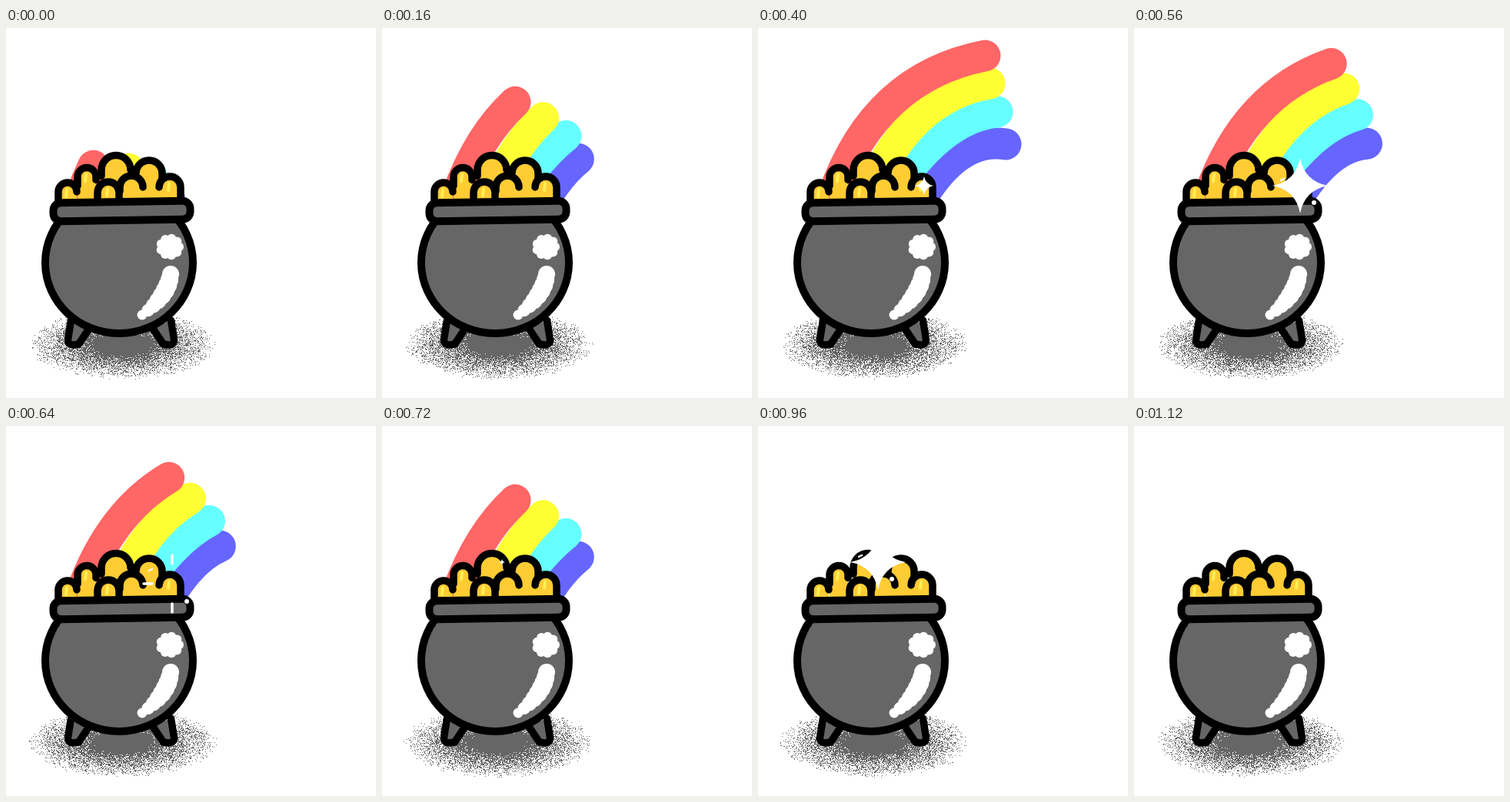
Recreate the animation shown at these times as an HTML page with a canvas. Size 481x481 px, loop 1200 ms.

```html
<!DOCTYPE html>
<html lang="en">
<head>
<meta charset="utf-8">
<title>Pot of gold</title>
<style>
  html, body { margin: 0; width: 100%; height: 100%; overflow: hidden; background: #fff; }
  canvas { display: block; width: 100vw; height: 100vh; }
</style>
</head>
<body>
<canvas id="stage" width="481" height="481"></canvas>
<script>
const ctx = document.getElementById('stage').getContext('2d');
const STEP = 80, STEPS = 15, PEAK = 5;
const GREY = '#666', GOLD = '#ffcc33', SHINE = '#ffee55';

// Quadratic curves, back to front: colour, base, control, full tip.
const bands = [
  ['#6666ff', [198, 248], [252, 140], [322, 151]],
  ['#66ffff', [172, 218], [238, 116], [311, 109]],
  ['#ffff33', [145, 214], [198, 89], [301, 72]],
  ['#ff6666', [98, 217], [152, 64], [295, 36]]
];

// Arches: centre x, top y, radius, left leg, right leg.
const coins = [
  [143, 165.5, 19, 8, 0], [186, 172, 17, 0, 7], [105, 181.5, 12, 12, 4],
  [213, 193, 14, 0, 18], [80, 201, 12, 12, 0], [163, 192, 15, 5, 0],
  [133, 200, 14, 8, 8]
];

// Position, first step, steps alive.
const sparkles = [[106, 188, 3, 2], [216, 205, 4, 5], [156, 177, 9, 5]];

const mix = (a, b, t) => a + (b - a) * t;
const between = (p, q, t) => [mix(p[0], q[0], t), mix(p[1], q[1], t)];

function ink(color, width) {
  ctx.strokeStyle = color;
  ctx.lineWidth = width;
  ctx.stroke();
}

function paint(color) {
  ctx.fillStyle = color;
  ctx.fill();
}

function line(x1, y1, x2, y2, color, width) {
  ctx.beginPath();
  ctx.moveTo(x1, y1);
  ctx.lineTo(x2, y2);
  ink(color, width);
}

function dot(x, y, r) {
  ctx.beginPath();
  ctx.arc(x, y, r, 0, Math.PI * 2);
  paint('#fff');
}

function random(seed) {
  return () => {
    seed = (seed + 0x6D2B79F5) | 0;
    let t = Math.imul(seed ^ (seed >>> 15), 1 | seed);
    t = (t + Math.imul(t ^ (t >>> 7), 61 | t)) ^ t;
    return ((t ^ (t >>> 14)) >>> 0) / 4294967296;
  };
}

// Grainy shadow, reshuffled at each step.
function shadow(step) {
  const rnd = random(step * 977 + 5);
  ctx.fillStyle = GREY;
  for (let y = 366; y < 458; y++) {
    for (let x = 27; x < 276; x++) {
      const d = Math.hypot((x - 151) / 124, (y - 411) / 46);
      if (rnd() < 1.4 * (1 - d)) ctx.fillRect(x, y, 1, 1);
    }
  }
}

// Grows until the peak, then shrinks back along the same curve.
function rainbow(step) {
  const stage = PEAK - Math.abs(step - PEAK - (step > PEAK ? 1 : 0));
  if (stage < 0) return;
  const t = Math.min(1, 0.13 + 0.182 * stage);
  for (const [color, base, bend, end] of bands) {
    const mid = between(base, bend, t);
    const tip = between(mid, between(bend, end, t), t);
    ctx.beginPath();
    ctx.moveTo(...base);
    ctx.quadraticCurveTo(...mid, ...tip);
    ink(color, 41);
  }
}

function arch(x, top, r, left, right) {
  const y = top + r;
  ctx.beginPath();
  ctx.moveTo(x - r, y + left);
  ctx.lineTo(x - r, y);
  ctx.arc(x, y, r, Math.PI, 0);
  ctx.lineTo(x + r, y + right);
}

function gold() {
  for (const [x, top, r] of coins) {
    arch(x, top, r, 232 - top - r, 232 - top - r);
    paint(GOLD);
  }
  for (const [x, top, r] of coins)
    if (r < 15) line(x - 2, top + 18, x - 1, top + 9, SHINE, 4);
  for (const c of coins) {
    arch(...c);
    ink('#000', 9.5);
  }
}

// side is 1 for the left leg, -1 for its mirror image.
function leg(side) {
  const x = d => 149.5 - side * d;
  ctx.beginPath();
  ctx.moveTo(x(65), 380);
  ctx.lineTo(x(69), 405);
  ctx.quadraticCurveTo(x(69), 412, x(62), 412);
  ctx.lineTo(x(55), 411);
  ctx.lineTo(x(41), 390);
  paint(GREY);
  ink('#000', 9.5);
}

function pot() {
  leg(1);
  leg(-1);
  ctx.beginPath();
  ctx.ellipse(147, 305, 96, 92, 0, -Math.PI / 4, Math.PI * 5 / 4);
  paint(GREY);
  ink('#000', 10);

  ctx.save();
  ctx.translate(150.5, 238);
  ctx.rotate(-0.015);
  ctx.beginPath();
  ctx.roundRect(-89, -12, 178, 24, 10);
  paint(GREY);
  ink('#000', 10);
  ctx.restore();
}

function gloss() {
  dot(213, 284, 14);
  for (let a = 0; a < 9; a++)
    dot(213 + 12 * Math.cos(a * 0.7), 284.5 + 11 * Math.sin(a * 0.7), 6);
  for (let t = 0; t <= 1; t += 0.125) {
    const p = between([214, 320], [210, 349], t);
    const q = between([210, 349], [177, 373], t);
    dot(...between(p, q, t), 11 + 3 * Math.sin(Math.PI * t) - 4.5 * t);
  }
}

function star(x, y, r) {
  const k = r * 0.16;
  ctx.beginPath();
  ctx.moveTo(x, y - r);
  ctx.quadraticCurveTo(x + k, y - k, x + r, y);
  ctx.quadraticCurveTo(x + k, y + k, x, y + r);
  ctx.quadraticCurveTo(x - k, y + k, x - r, y);
  ctx.quadraticCurveTo(x - k, y - k, x, y - r);
  paint('#fff');
}

// The star swells, then breaks into rays and specks.
function sparkle(x, y, age) {
  if (age < 4) star(x, y, Math.max(4, 12 * age));
  else for (const [dx, dy] of [[0, -1], [-1, 0], [0, 1]])
    line(x + 26 * dx, y + 26 * dy, x + 37 * dx, y + 37 * dy, '#fff', 3.5);
  if (age < 3) return;
  const fly = age - 3;
  dot(x + 18 + fly, y + 22 + fly, 3);
  const px = x - 23 - 5 * fly, py = y - 8 - 10 * fly;
  line(px - 2, py + 1, px + 2, py - 1, '#fff', 2.5);
}

function draw(step) {
  ctx.fillStyle = '#fff';
  ctx.fillRect(0, 0, 481, 481);
  ctx.lineCap = ctx.lineJoin = 'round';
  shadow(step);
  rainbow(step);
  gold();
  pot();
  gloss();
  for (const [x, y, born, life] of sparkles) {
    const age = step - born;
    if (age >= 0 && age < life) sparkle(x, y, age);
  }
}

let shown = -1;
const start = performance.now();
function tick() {
  const step = Math.floor((performance.now() - start) / STEP) % STEPS;
  if (step !== shown) draw(shown = step);
  requestAnimationFrame(tick);
}
tick();
</script>
</body>
</html>
```
